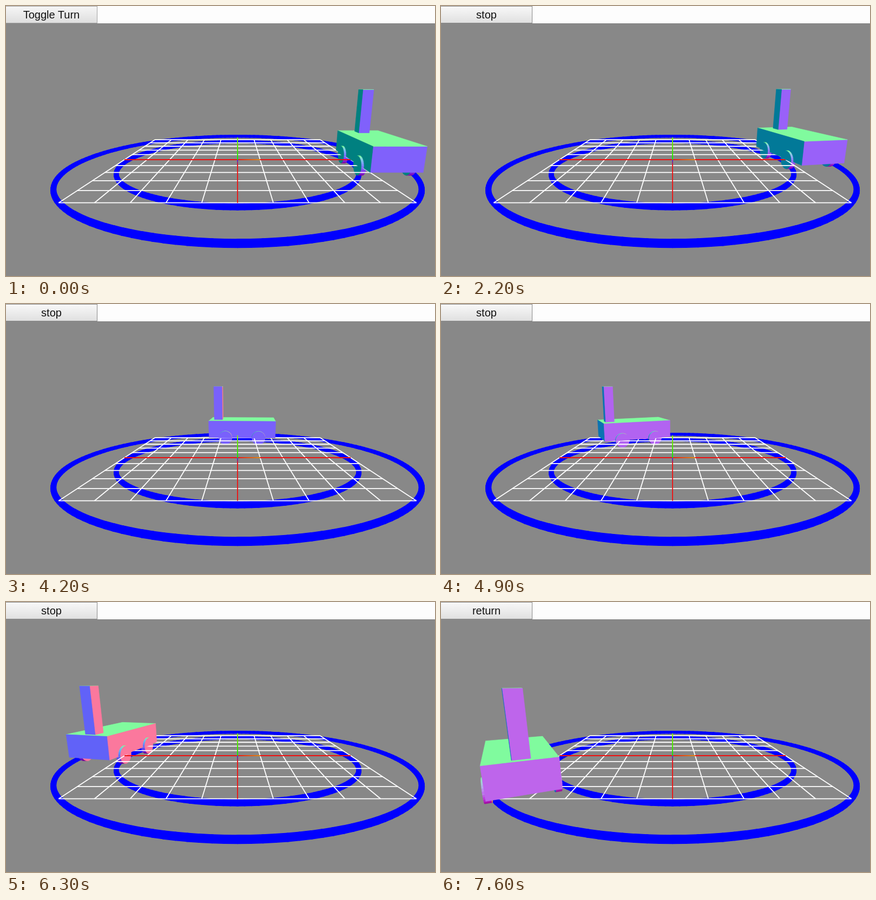
Recreate the animation shown at these times as an HTML page with a canvas. Size 793 by 499 pixels, loop 8000 ms.

```html
<!DOCTYPE html>
<html lang="en">
<head>
<meta charset="utf-8">
<title>Cart on a round track</title>
<style>
  html, body { margin: 0; width: 100%; height: 100%; overflow: hidden; background: #fdfdfd; }
  canvas { position: absolute; left: 0; top: 0; }
  #button {
    position: absolute; left: -1px; top: 0; width: 170px; height: 32px; box-sizing: border-box;
    border: 1px solid #a3a3a3; background: linear-gradient(#f6f6f6, #dedede);
    font: 20px/31px "Liberation Sans", Arial, sans-serif; color: #111; text-align: center;
  }
  #button.hover { border-color: #8a8a8a; background: linear-gradient(#f8f8f8, #e0e0e0); }
</style>
</head>
<body>
<canvas id="stage" width="793" height="499"></canvas>
<div id="button"></div>
<script>
const ctx = document.getElementById('stage').getContext('2d');
const button = document.getElementById('button');

// The camera looks at the origin, tilted down by PITCH
const FOCAL = 552, DIST = 13.2, CX = 428, CY = 284, PITCH = 0.2434;
const SIN = Math.sin(PITCH), COS = Math.cos(PITCH);
const EYE = [0, DIST * SIN, DIST * COS];
const TRACK = 6, SPEED = 0.66, LOOP = 8000;
let angle = 0;

function project([x, y, z]) {
  const scale = FOCAL / (DIST - z * COS - y * SIN);
  return [CX + x * scale, CY - (y * COS - z * SIN) * scale, scale];
}

function line(from, to, color, width = 1.8) {
  ctx.strokeStyle = color;
  ctx.lineWidth = width;
  ctx.beginPath();
  ctx.moveTo(from[0], from[1]);
  ctx.lineTo(to[0], to[1]);
  ctx.stroke();
}

function axis(end, startColor, endColor) {
  const from = project([0, 0, 0]), to = project(end);
  const fade = ctx.createLinearGradient(from[0], from[1], to[0], to[1]);
  fade.addColorStop(0, startColor);
  fade.addColorStop(1, endColor);
  line(from, to, fade);
}

function ring(radius) {
  const steps = 160;
  const at = i => {
    const a = i / steps * 2 * Math.PI;
    return project([radius * Math.sin(a), -0.12, radius * Math.cos(a)]);
  };
  ctx.lineCap = 'round';
  for (let i = 0; i < steps; i++) {
    const from = at(i);
    line(from, at(i + 1), '#00f', 0.2 * from[2]);
  }
  ctx.lineCap = 'butt';
}

function grid() {
  for (let i = -5; i <= 5; i++) {
    if (!i) continue;
    line(project([i, 0, -5]), project([i, 0, 5]), '#fff');
    line(project([-5, 0, i]), project([5, 0, i]), '#fff');
  }
  line(project([0, 0, -5]), project([0, 0, 5]), '#f01010');
  line(project([-5, 0, 0]), project([5, 0, 0]), '#f01010');
}

// Cart space: a along the cart, y up, l outwards from the track's centre
function turn([a, y, l]) {
  const s = Math.sin(angle), c = Math.cos(angle);
  return [l * s + a * c, y, a * s - l * c];
}
const place = ([a, y, l]) => turn([a, y, l + TRACK]);

function isFacing(normal, point) {
  return normal.reduce((sum, n, i) => sum + n * (EYE[i] - point[i]), 0) > 0;
}

// Each face is coloured by its normal as seen from the camera
function face(points, direction) {
  const normal = turn(direction), world = points.map(place);
  if (!isFacing(normal, world[0])) return;
  const [x, y, z] = normal;
  const rgb = [x, y * COS - z * SIN, y * SIN + z * COS].map(v => Math.round(127.5 + 127.5 * v));
  ctx.fillStyle = ctx.strokeStyle = `rgb(${rgb})`;
  ctx.lineWidth = 0.6;
  ctx.beginPath();
  for (const p of world) {
    const [px, py] = project(p);
    ctx.lineTo(px, py);
  }
  ctx.closePath();
  ctx.fill();
  ctx.stroke();
}

// Outline in (a, y), counter-clockwise, extruded from l0 to l1
function prism(outline, l0, l1) {
  outline.forEach(([a, y], i) => {
    const [b, v] = outline[(i + 1) % outline.length];
    const length = Math.hypot(b - a, v - y);
    face([[a, y, l0], [b, v, l0], [b, v, l1], [a, y, l1]], [(v - y) / length, (a - b) / length, 0]);
  });
  face(outline.map(([a, y]) => [a, y, l0]), [0, 0, -1]);
  face(outline.map(([a, y]) => [a, y, l1]), [0, 0, 1]);
}

function box(a0, a1, y0, y1, l0, l1) {
  prism([[a0, y0], [a1, y0], [a1, y1], [a0, y1]], l0, l1);
}

function halfWheel(center, start, l0, l1) {
  const outline = Array.from({ length: 15 }, (_, i) => {
    const a = start + i / 14 * Math.PI;
    return [center + 0.4 * Math.cos(a), 0.4 * Math.sin(a)];
  });
  prism(outline, l0, l1);
}

function wheelBottoms() {
  for (const side of [1, -1])
    for (const a of [-1, 1]) halfWheel(a, Math.PI, side - 0.1, side + 0.1);
}

function wheelTops(visible) {
  for (const side of [1, -1]) {
    if (isFacing(turn([0, 0, side]), place([0, 0, side])) !== visible) continue;
    for (const a of [-1, 1]) halfWheel(a, 0, Math.min(side, side * 1.1), Math.max(side, side * 1.1));
  }
}

function draw(time) {
  const t = Math.floor(time % LOOP / 100) * 100;
  angle = Math.max(-2.085, Math.PI / 2 - SPEED * Math.max(0, t - 1900) / 1000);

  const label = t < 1800 ? 'Toggle Turn' : t < 7500 ? 'stop' : 'return';
  if (button.textContent !== label) button.textContent = label;
  button.className = t < 1300 ? '' : 'hover';

  ctx.clearRect(0, 0, 793, 499);
  ctx.fillStyle = '#888';
  ctx.fillRect(0, 32, 793, 467);
  ring(7);
  ring(5);
  wheelBottoms();
  grid();
  axis([1, 0, 0], '#f01010', '#e08a10');
  axis([0, 0, 1], '#2040ff', '#f01010');
  wheelTops(false);
  box(-2, 2, 0, 1, -1, 1);
  box(-1.75, -1.25, 1, 3, -0.25, 0.25);
  wheelTops(true);
  axis([0, 1, 0], '#00ff00', '#80ff00');
}

const start = performance.now();
function tick() {
  draw(performance.now() - start);
  requestAnimationFrame(tick);
}
tick();
</script>
</body>
</html>
```
